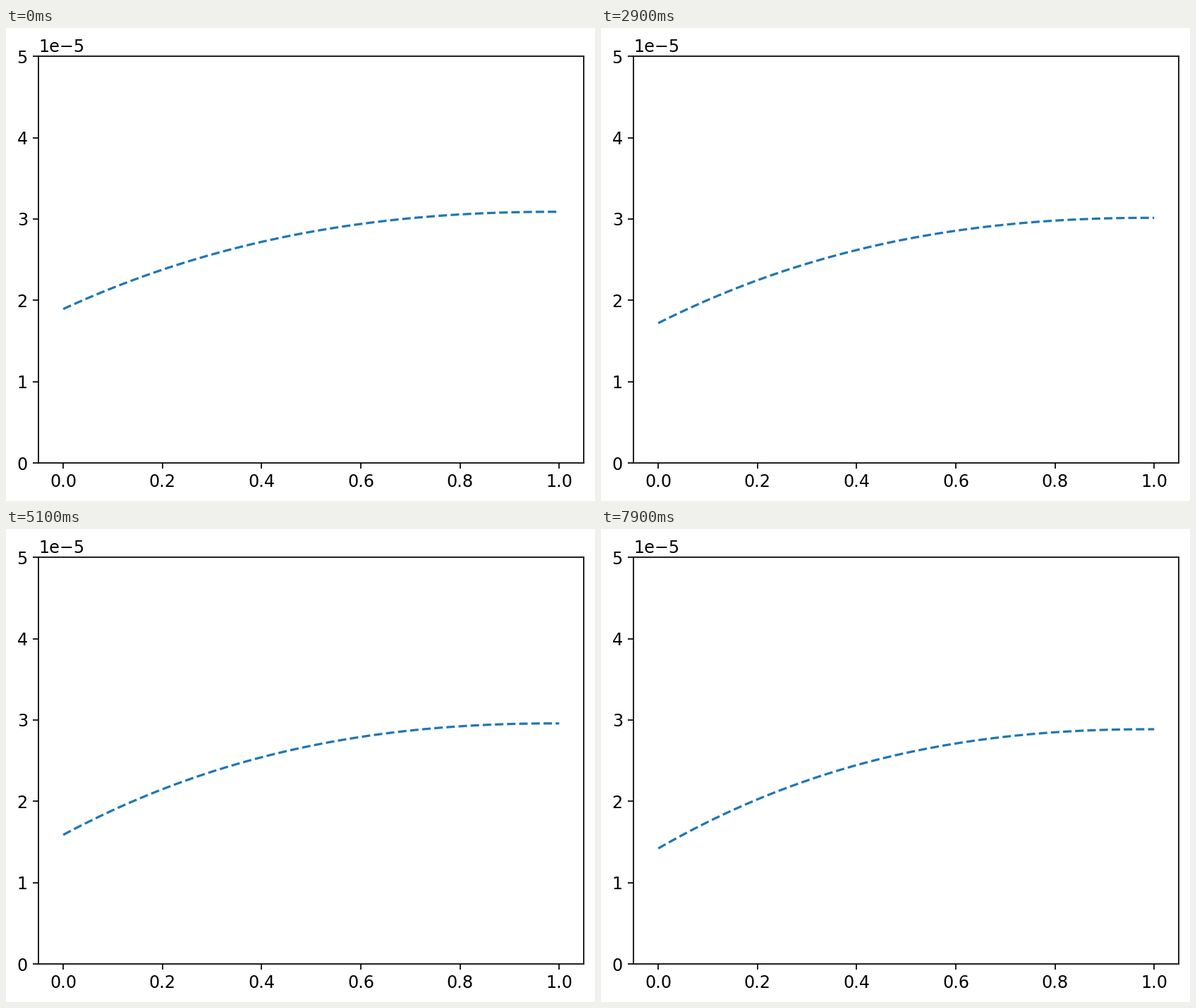
Animation, 835 px wide and 671 px high, one loop 8 s. Source, as a matplotlib script:

```python
import numpy as np
import matplotlib.pyplot as plt
from matplotlib.animation import FuncAnimation

W, H, DPI = 835, 671, 156
FRAMES, INTERVAL = 80, 100
LEFT, RIGHT, TOP, BOTTOM = 46, 819.4, 40.2, 617

plt.rcParams.update({"font.family": "DejaVu Sans", "font.size": 11})

fig = plt.figure(figsize=((W + 0.01) / DPI, (H + 0.01) / DPI), dpi=DPI)
ax = fig.add_axes([LEFT / W, 1 - BOTTOM / H,
                   (RIGHT - LEFT) / W, (BOTTOM - TOP) / H])
ax.set_xlim(-0.05, 1.05)
ax.set_ylim(0, 5e-5)

x = np.linspace(0, 1, 101)
u = 1 - x

# Right-end level, then the linear, quadratic and cubic terms in u
START = np.array([3.088, 0.019, -0.824, -0.390])
END = np.array([2.886, 0.022, -0.924, -0.564])


def profile(i):
    level, a, b, c = START + (END - START) * i / (FRAMES - 1)
    return 1e-5 * (level + a * u + b * u**2 + c * u**3)


line, = ax.plot(x, profile(0), "--", color="tab:blue", lw=1.5)


def update(i):
    line.set_ydata(profile(i))
    return line,


anim = FuncAnimation(fig, update, frames=FRAMES, interval=INTERVAL,
                     repeat=True, repeat_delay=0)
plt.show()
```
